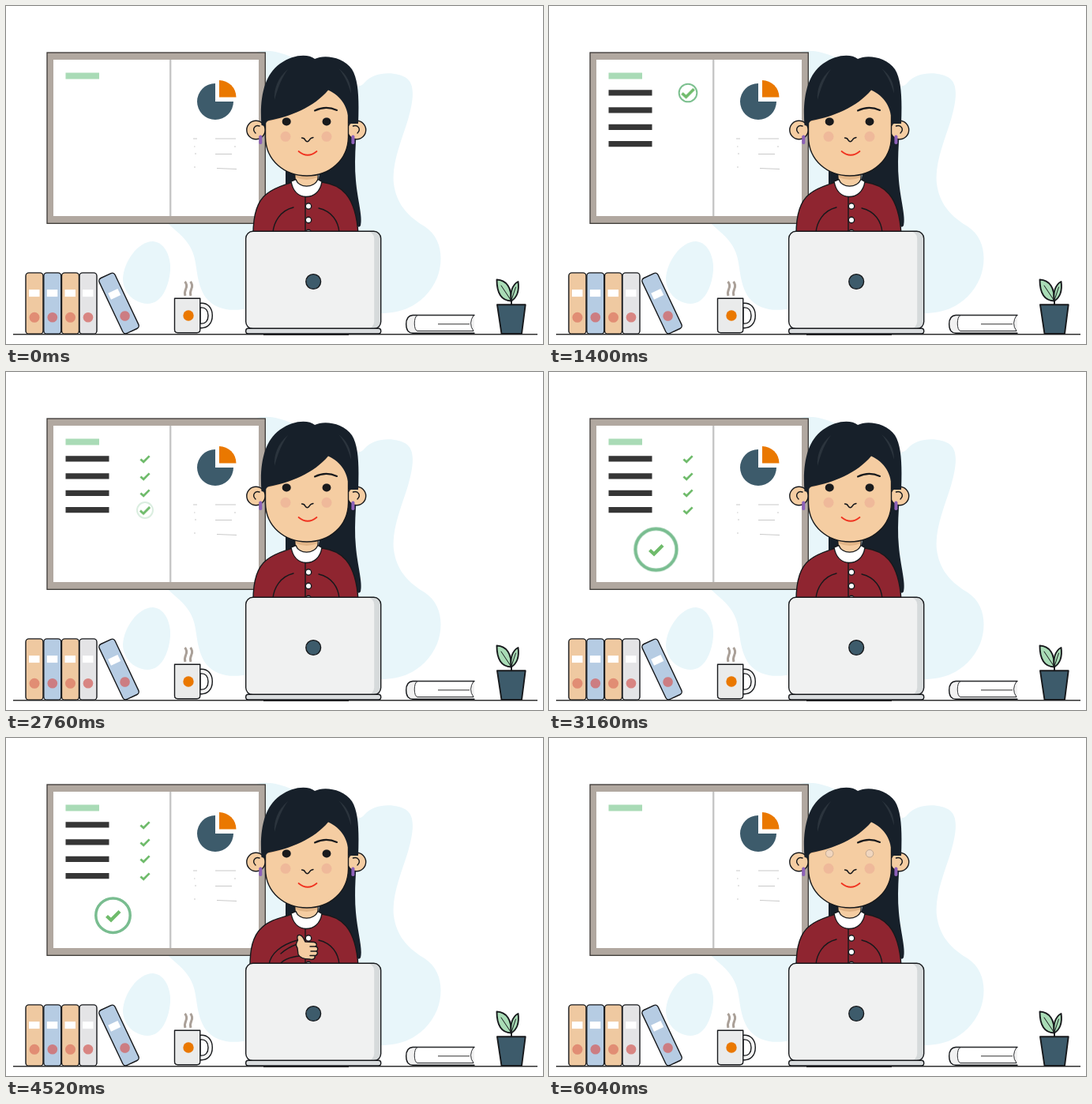
Recreate the animation shown at these times as an HTML page. Size 680x428 px, loop 6.08 s.

```html
<!DOCTYPE html>
<html lang="en">
<head>
<meta charset="utf-8">
<title>Checklist at the desk</title>
<style>
html, body { margin: 0; width: 100%; height: 100%; overflow: hidden; background: #fff; }
svg { display: block; width: 100vw; height: 100vh; }
.ink { stroke: #17191c; stroke-width: 1.4; stroke-linecap: round; stroke-linejoin: round; }
.line { fill: none; }
.skin { fill: #f5cda2; }
.red { fill: #8f2530; }
.slate { fill: #3d5b6b; }
.tan { fill: #efc9a1; }
.blue { fill: #b6cce3; }
.grey { fill: #e4e4e6; }
.leaf { fill: #a9dcb6; }

.anim { animation: 6.08s linear infinite both; }
.pop { transform-box: fill-box; transform-origin: center; }
.tick { fill: none; stroke: #6fbb6b; stroke-width: 2.7; }
.ring { fill: none; stroke: #7cc08f; stroke-width: 2; animation-name: ring; }

/* checklist */
.list { animation-name: leave; }
@keyframes leave { 0%, 95.07% { opacity: 1 } 99.34%, 100% { opacity: 0 } }

.b1 { animation-name: b1 } .b2 { animation-name: b2 }
.b3 { animation-name: b3 } .b4 { animation-name: b4 }
@keyframes b1 { 0%, .33% { opacity: 0 } 4.93%, 100% { opacity: 1 } }
@keyframes b2 { 0%, 2.96% { opacity: 0 } 7.57%, 100% { opacity: 1 } }
@keyframes b3 { 0%, 5.76% { opacity: 0 } 10.36%, 100% { opacity: 1 } }
@keyframes b4 { 0%, 8.55% { opacity: 0 } 13.16%, 100% { opacity: 1 } }

.t1 { animation-name: t1 } .t2 { animation-name: t2 }
.t3 { animation-name: t3 } .t4 { animation-name: t4 }
@keyframes t1 { 0%, 20.07% { transform: scale(0) } 23.03%, 25% { transform: scale(1.35) } 28.62%, 100% { transform: scale(1) } }
@keyframes t2 { 0%, 25.99% { transform: scale(0) } 28.95%, 30.92% { transform: scale(1.35) } 34.54%, 100% { transform: scale(1) } }
@keyframes t3 { 0%, 31.91% { transform: scale(0) } 34.87%, 36.84% { transform: scale(1.35) } 40.46%, 100% { transform: scale(1) } }
@keyframes t4 { 0%, 37.83% { transform: scale(0) } 40.79%, 42.76% { transform: scale(1.35) } 46.38%, 100% { transform: scale(1) } }

.r1 { animation-delay: 1.22s } .r2 { animation-delay: 1.58s }
.r3 { animation-delay: 1.94s } .r4 { animation-delay: 2.3s }
@keyframes ring {
  0% { r: 0; opacity: 0 }
  .5% { opacity: 1 }
  2.96% { r: 11.3px; opacity: 1 }
  4.93% { r: 16px; opacity: 1 }
  5.6% { r: 14px; opacity: .85 }
  8.55%, 100% { r: 8px; opacity: 0 }
}

.done { animation-name: done; }
.doneTick { animation-name: doneTick; }
@keyframes done { 0%, 46.05% { transform: scale(0) } 51.97% { transform: scale(1.2) } 52.63% { transform: scale(1.24) } 54.61%, 100% { transform: scale(1) } }
@keyframes doneTick { 0%, 46.05% { transform: scale(0) } 51.3%, 100% { transform: scale(1) } }

/* person */
.eye { animation-name: blink; }
@keyframes blink {
  0%, 5.3% { opacity: 1 } 7.2%, 7.9% { opacity: 0 } 9.9%, 30% { opacity: 1 }
  32%, 32.6% { opacity: 0 } 34.5%, 51.98% { opacity: 1 }
  53.2%, 53.4% { opacity: 0 } 54.6%, 69.4% { opacity: 1 }
  71.7%, 72.4% { opacity: 0 } 74.3%, 97.1% { opacity: 1 }
  99.3%, 100% { opacity: 0 }
}
.arm { animation-name: lift; }
@keyframes lift {
  0%, 58.2% { transform: translate(-6px, 42px); animation-timing-function: ease-in-out }
  63.16%, 86.7% { transform: none; animation-timing-function: ease-in-out }
  91.45%, 100% { transform: translate(-6px, 42px) }
}
.torso { animation-name: torso; }
@keyframes torso {
  0%, 58.2% { d: path("M313 289C313 265 318 247 330 238C339 230 352 227 362 223Q380 250 400 223C423 226 443 238 446 289"); animation-timing-function: ease-in-out }
  63.16%, 86.7% { d: path("M309 289C309 268 312 251 324 240C335 229 352 227 362 223Q380 250 400 223C423 226 443 238 446 289"); animation-timing-function: ease-in-out }
  91.45%, 100% { d: path("M313 289C313 265 318 247 330 238C339 230 352 227 362 223Q380 250 400 223C423 226 443 238 446 289") }
}
.fold { animation-name: fold; }
@keyframes fold {
  0%, 58.2% { d: path("M338 287C339 274 347 259 364 255"); animation-timing-function: ease-in-out }
  63.16%, 86.7% { d: path("M333 287C335 273 348 262 369 256"); animation-timing-function: ease-in-out }
  91.45%, 100% { d: path("M338 287C339 274 347 259 364 255") }
}
</style>
</head>
<body>
<svg viewBox="0 0 680 428" preserveAspectRatio="none">
  <defs>
    <path id="tick" d="M-5.6 .4L-1.8 3.8L5.6 -3.6"/>
    <g id="book">
      <rect class="ink" x="-11" y="-38.7" width="22" height="77.4" rx="4"/>
      <path fill="#fff" d="M-7-17.5H6.5V-8.5H-7z"/>
    </g>
  </defs>

  <g fill="#e8f6fa">
    <path d="M318 58C342 52 370 68 398 82C420 94 444 110 454 97C466 83 494 82 508 92C519 101 515 123 509 144C501 170 488 200 491 225C495 254 512 268 530 279C553 294 554 323 546 344C533 374 507 390 472 389L300 384C274 388 254 378 247 358C239 336 243 321 232 303C224 290 212 283 204 274Z"/>
    <path d="M186 298C201 299 209 317 208 335C206 356 197 377 179 377C160 376 148 361 148 345C149 324 167 298 186 298Z"/>
  </g>

  <!-- board -->
  <rect x="52" y="59" width="276.3" height="216.3" fill="#b1a8a0" stroke="#3b3835" stroke-width="1.3"/>
  <path fill="#fff" d="M60 68H320V266H60z"/>
  <path d="M208.2 68V266" stroke="#c6c6c6" stroke-width="2.4"/>
  <path fill="#a9dbb6" d="M75.5 84.5H118V92.5H75.5z"/>
  <path class="slate" d="M265 121V98A23 23 0 1 0 288 121Z"/>
  <path fill="#ea7800" d="M270 115.5V94A21.5 21.5 0 0 1 291.5 115.5Z"/>
  <path class="line" stroke="#c3c3c3" stroke-width=".9" d="M237 168H242M265 168H291M238 178H239.5M289 178H291M239 187H241M265 187.5H286M238 204H240M267 205.5L292 206.5"/>

  <g class="list anim">
    <g fill="#363636">
      <path class="anim b1" d="M75.5 106.3H130.5V113.5H75.5z"/>
      <path class="anim b2" d="M75.5 128.3H130.5V135.5H75.5z"/>
      <path class="anim b3" d="M75.5 149.7H130.5V156.9H75.5z"/>
      <path class="anim b4" d="M75.5 171H130.5V178.2H75.5z"/>
    </g>
    <g transform="translate(176 110)"><circle class="ring anim r1"/><g class="anim t1"><use href="#tick" class="tick"/></g></g>
    <g transform="translate(176 132)"><circle class="ring anim r2"/><g class="anim t2"><use href="#tick" class="tick"/></g></g>
    <g transform="translate(176 153)"><circle class="ring anim r3"/><g class="anim t3"><use href="#tick" class="tick"/></g></g>
    <g transform="translate(176 175)"><circle class="ring anim r4"/><g class="anim t4"><use href="#tick" class="tick"/></g></g>
    <circle class="anim pop done" cx="135.5" cy="224.7" r="21.7" fill="none" stroke="#79bd90" stroke-width="3.5"/>
    <path class="tick anim pop doneTick" style="stroke-width:4.3" d="M127.5 225.5L133 230.5L144 219.5"/>
  </g>

  <!-- hair behind -->
  <path fill="#17202a" d="M354 190H380V225H354zM400 190L434 160L446 120C445 155 440 190 443 221C445 245 452 267 449 278Q447 282 443 277L395 225Z"/>

  <!-- body -->
  <path class="skin ink" d="M366 205V228Q380 246 395 228V205"/>
  <path fill="#e2b587" d="M366.7 210H394.3V217Q381 223 366.7 217z"/>
  <path class="red ink torso anim" d="M313 289C313 265 318 247 330 238C339 230 352 227 362 223Q380 250 400 223C423 226 443 238 446 289"/>
  <path class="ink" fill="#fff" d="M361 222L367 219.5C371 231 390 231 395 219.5L400 222.5C398 235 390 241.5 380 241.5C370 241 363 234 361 222Z"/>
  <path class="ink line" d="M379 242V287M422 287C421 273 413 260 396 256"/>
  <path class="ink line fold anim" d="M338 287C339 274 347 259 364 255"/>
  <g class="ink" fill="#fff" stroke-width="1"><circle cx="383" cy="253.5" r="3.7"/><circle cx="383" cy="271" r="3.7"/><circle cx="383" cy="287" r="3.7"/></g>
  <g class="arm anim">
    <path class="red" d="M336 292C337 274 353 264 369 260L374 275C364 279 358 284 352 292Z"/>
    <path class="ink line" d="M345 289C350 280 360 277 373 276M348 273Q357 265 369 261"/>
    <path class="skin ink" d="M369 266C366 262 368 259 369.5 256C368 252 369 249 372 249.5C376 250 377 255 379 258L390 258.5C394 259 394 263 392 264C396 265 395 269 393 270C396 272 394 275 391 276C392 280 388 281 384 280C378 280 372 278 370 274Z"/>
    <path class="ink line" stroke-width="1" d="M385 264H392M386 270H393M385 275.5H391"/>
  </g>

  <!-- head -->
  <g class="skin ink"><circle cx="316.5" cy="157" r="11.7"/><circle cx="444" cy="157" r="11.7"/></g>
  <path class="ink line" d="M321 152C315 150 311 156 316 161M439.5 152C446 150 450 156 445 161"/>
  <path class="skin ink" d="M328.5 135V166C329 196 353 215 381 215C410 215 433 195 433.5 166V125L405 95L350 110Z"/>
  <path fill="#e9bb8d" d="M329 147C358 141 390 128 408 107L404 103L329 140z"/>
  <path fill="#17202a" d="M323.5 151C321 118 326 88 347 73C363 61 383 60 391 67C402 61 427 64 438 80C447 94 447 121 446 149H434C434 129 425 114 408 106.5C390 128 360 140 333 145Q329 146 328 152Z"/>
  <path fill="#2b343d" d="M357 80C344 91 339 105 340 119C344 104 349 91 357 80ZM421 79C432 87 437 98 437 111C433 97 428 87 421 79Z"/>
  <g fill="#8d61b8"><rect x="320.3" y="163.5" width="4" height="11.5" rx="1.8"/><rect x="437.4" y="163.5" width="4" height="11.5" rx="1.8"/></g>
  <path class="ink line" style="stroke-width:2" d="M391 132.5Q405 125.5 419 132"/>
  <g fill="#f0d6bf" stroke="#bda48f" stroke-width=".9"><circle cx="355.2" cy="146.3" r="4.8"/><circle cx="406" cy="146.3" r="4.8"/></g>
  <g class="eye anim" fill="#191a1c"><ellipse cx="355.2" cy="146.4" rx="5.5" ry="5"/><ellipse cx="406" cy="146.4" rx="5.4" ry="5"/></g>
  <g fill="#efb99a"><circle cx="354" cy="165.3" r="6.5"/><circle cx="406" cy="165.3" r="6.5"/></g>
  <path class="ink line" d="M374.5 167Q378 167 379 170Q381.5 173.5 384 170Q385.5 167 389 166.5"/>
  <path class="line" stroke="#f0321f" stroke-width="1.7" stroke-linecap="round" d="M370.5 184Q382 193.5 393.5 184"/>

  <!-- desk -->
  <path d="M9 415.8H673" stroke="#303030" stroke-width="1.4"/>
  <path d="M326 416H434" stroke="#222" stroke-width="2"/>
  <rect x="303.7" y="285.3" width="171" height="123.5" rx="9" fill="#d6dadb"/>
  <rect x="303.7" y="285.3" width="162.5" height="123.5" rx="9" fill="#f0f1f1"/>
  <rect class="ink line" x="303.7" y="285.3" width="171" height="123.5" rx="9"/>
  <rect class="ink" x="303.7" y="408.2" width="171" height="6.8" rx="3" fill="#d9dcde"/>
  <circle class="slate ink" cx="389.2" cy="349" r="9.4"/>

  <!-- books -->
  <g transform="translate(36 376.6)"><use href="#book" class="tan"/><circle cy="17.7" r="6.5" fill="#e18d74"/></g>
  <g transform="translate(58.8 376.6)"><use href="#book" class="blue"/><circle cy="17.7" r="6.3" fill="#cc7d82"/></g>
  <g transform="translate(81.5 376.6)"><use href="#book" class="tan"/><circle cy="17.7" r="6.5" fill="#e18d74"/></g>
  <g transform="translate(104 376.6)"><use href="#book" class="grey"/><circle cy="17.7" r="6.3" fill="#d88582"/></g>
  <g transform="translate(143 376.5) rotate(-25.3)"><use href="#book" class="blue"/><circle cy="17.7" r="6.3" fill="#cc7d82"/></g>

  <!-- mug -->
  <path class="ink" fill="#f3f3f3" fill-rule="evenodd" d="M245 376.5C256 375 261.3 383 261.3 392C261.3 402 255 409 245 407.5ZM246 382V402C253 403 256 398 256 392C256 386 253 381 246 382Z"/>
  <path class="ink" fill="#eaebeb" d="M213.5 370.3H245.8V410Q245.8 413.7 242 413.7H217.3Q213.5 413.7 213.5 410Z"/>
  <circle cx="231" cy="392" r="6.7" fill="#ea7800"/>
  <path class="line" stroke="#aaa098" stroke-width="3" d="M226.5 349Q230 353 227.8 358T227 367M233.5 349Q237 353 234.8 358T234 367"/>

  <!-- flat book -->
  <path class="ink" fill="#f1f1f1" d="M593 391.5H515C509 392 506.7 396 506.7 403C506.7 410 509 414 515 414.3H593"/>
  <path class="ink" fill="#fff" d="M592 391.8H521C516 393 516 411 521 411.5H592Q585 402 592 391.8Z" stroke-width="1" style="stroke-width:.9"/>
  <path d="M547 402.8H587" stroke="#333" stroke-width="1"/>

  <!-- plant -->
  <g class="ink" style="stroke-width:1.9">
    <path class="line" d="M640 379V371"/>
    <path class="leaf" d="M621.5 346.5C634 347 640.5 357 639.5 373.5C627 373 621.5 363 621.5 346.5Z"/>
    <path class="leaf" d="M648.5 349C650 360 647 369 640 373.5C638 363 641 353 648.5 349Z"/>
    <path class="line" d="M627 354L639 372M645.5 356L640.5 371" style="stroke-width:1"/>
    <path class="slate" d="M622 378.3H657.7L653 415H627.5Z"/>
  </g>
</svg>
</body>
</html>
```
